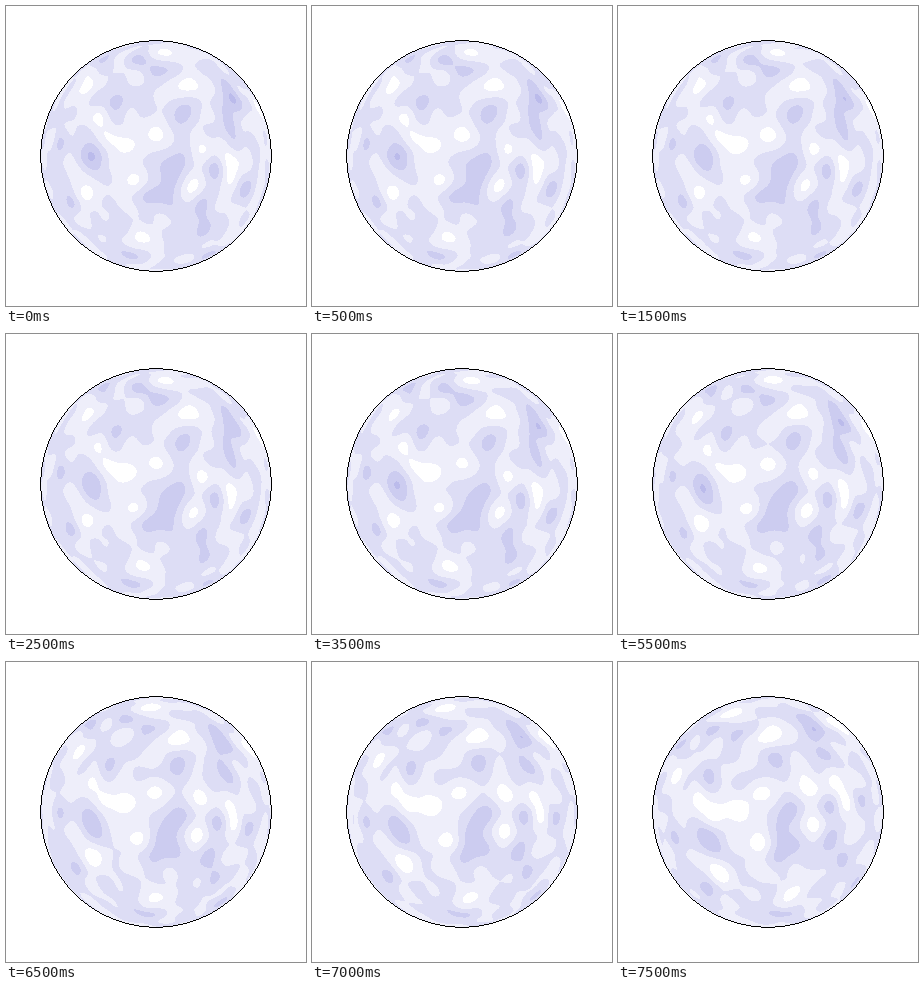
A matplotlib script for the animation above (8000 ms loop, 300x300 px).

```python
import numpy as np
import matplotlib.pyplot as plt
from matplotlib.animation import FuncAnimation

SIZE, DPI = 300, 100
MID, RADIUS = 149.5, 115.7
FRAMES, STEP = 16, 500
SPIN, GROWTH = 23.5, 1.08   # final turn in degrees, speed-up per second
SPREAD = 0.125              # reach of a spot on the unit sphere
BASE, RIPPLE = 0.04, 0.25

PALETTE = np.array([(187, 187, 235), (204, 204, 240), (221, 221, 245),
                    (238, 238, 250), (255, 255, 255)], np.uint8)
LEVELS = [-2, -1, 0, 1]

# Centres of the main spots
PEAKS = [(153, 45), (176, 82), (188, 82), (79, 80), (91, 111), (103, 131),
         (152, 131), (126, 138), (197, 144), (129, 175), (184, 181),
         (224, 172), (224, 151), (77, 188), (140, 233), (249, 99)]
TROUGHS = [(134, 52), (152, 67), (217, 76), (225, 118), (177, 103),
           (108, 96), (55, 137), (160, 161), (174, 155), (142, 191),
           (158, 191), (64, 194), (210, 168), (241, 178), (193, 200),
           (199, 223), (123, 249), (203, 248), (98, 52)]
CORES = [(226, 94), (83, 149)]


def sphere(x, y, deg=0):
    """Lift picture points onto the front of a unit sphere, turned by deg."""
    a = np.radians(deg)
    u, v = (x - MID) / RADIUS, (y - MID) / RADIUS
    w = np.sqrt(np.clip(1 - u * u - v * v, 0, 1))
    return np.stack([u * np.cos(a) - v * np.sin(a),
                     u * np.sin(a) + v * np.cos(a), w], axis=-1)


def bump(p, q):
    return np.exp(-((p - q) ** 2).sum(axis=-1) / SPREAD ** 2)


rng = np.random.default_rng(7)
spots = sphere(*np.array(PEAKS + TROUGHS + CORES, float).T)
heights = np.repeat([1.22, -1.35, -2.1],
                    [len(PEAKS), len(TROUGHS), len(CORES)])
solver = np.linalg.inv(np.array([bump(spots, q) for q in spots])
                       + 0.03 * np.eye(len(spots)))
phase = rng.uniform(0, 2 * np.pi, len(spots))
rate = rng.uniform(0.5, 1.6, len(spots))

# Fine ripples: random plane waves cut by the sphere
WAVES = 30
normal = rng.normal(size=(WAVES, 3))
normal *= (rng.uniform(18, 30, WAVES) / np.linalg.norm(normal, axis=1))[:, None]
offset = rng.uniform(0, 2 * np.pi, WAVES)
drift = rng.normal(0, 0.1, WAVES)


def ripple(p, t, ramp):
    total = sum(np.sin(p @ k + o + d * (t + 8 * ramp))
                for k, o, d in zip(normal, offset, drift))
    return BASE + RIPPLE * np.sqrt(2 / WAVES) * total


py, px = np.mgrid[:SIZE, :SIZE].astype(float)
inside = np.hypot(px - MID, py - MID) <= RADIUS
core = inside.copy()
for axis in (0, 1):
    for shift in (-1, 1):
        core &= np.roll(inside, shift, axis)
rim = inside & ~core


def field(t):
    ramp = np.exp(GROWTH * (t - 7.5))
    p = sphere(px, py, SPIN * ramp)
    shimmer = 1 + 0.07 * np.sin(rate * t + phase)
    swell = np.where(heights > 0, 1 + 0.2 * ramp, 1)
    weights = solver @ (heights * shimmer * swell - ripple(spots, t, ramp))
    return ripple(p, t, ramp) + sum(w * bump(p, q)
                                    for w, q in zip(weights, spots))


def render(i):
    rgb = PALETTE[np.digitize(field(i * STEP / 1000), LEVELS)]
    rgb[~inside] = 255
    rgb[rim] = 0
    return rgb


fig = plt.figure(figsize=(SIZE / DPI, SIZE / DPI), dpi=DPI, facecolor="white")
ax = fig.add_axes([0, 0, 1, 1])
ax.axis("off")
image = ax.imshow(render(0), interpolation="nearest", aspect="auto")


def update(i):
    image.set_data(render(i))
    return [image]


anim = FuncAnimation(fig, update, frames=FRAMES, interval=STEP,
                     repeat=True, repeat_delay=0)
plt.show()
```
